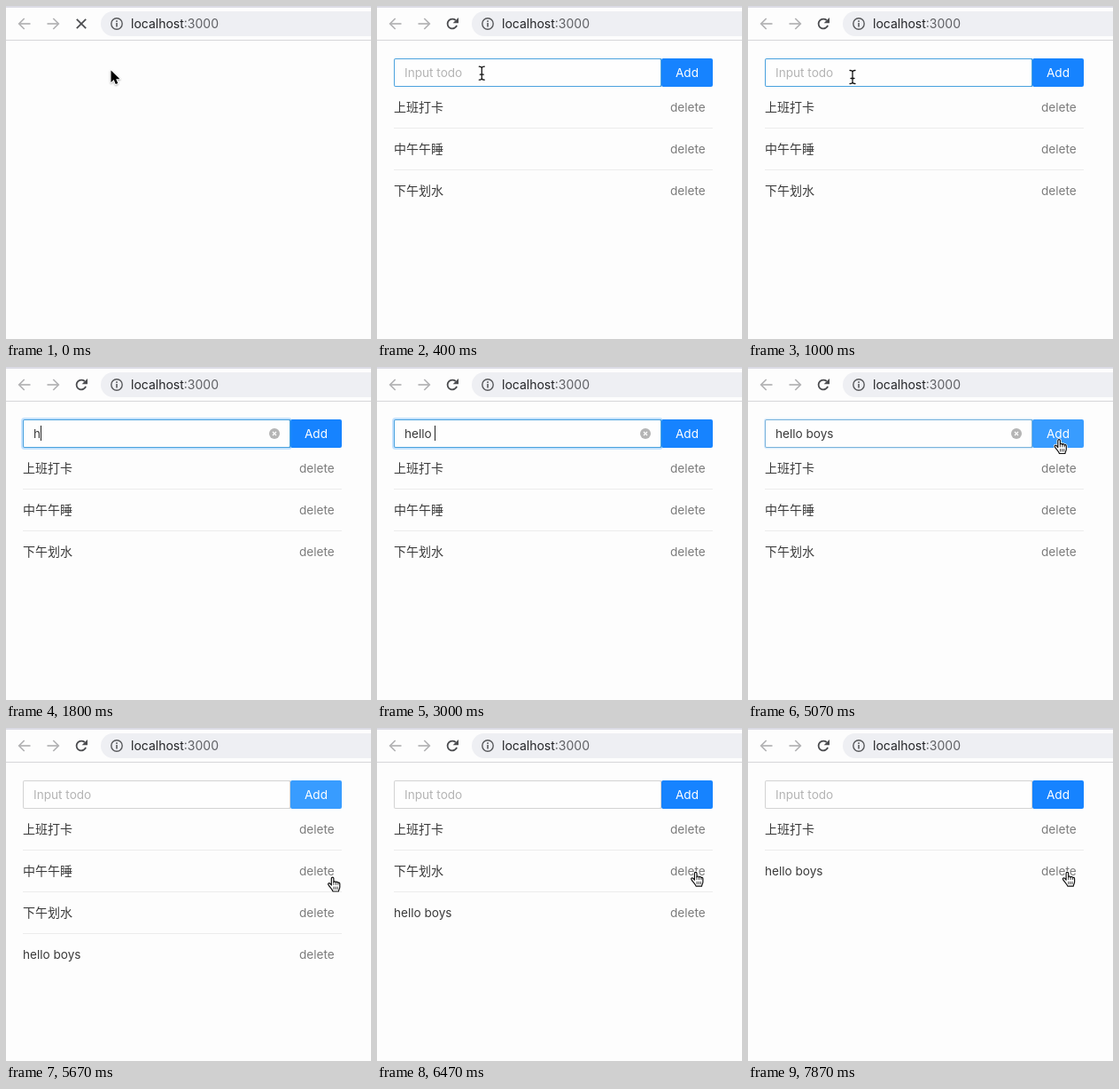
An HTML page with a canvas that plays this animation: 412x375 px, repeating every 8.27 s.

```html
<!DOCTYPE html>
<html lang="en">
<head>
<meta charset="utf-8">
<title>Todo list</title>
<style>
  html, body { margin: 0; width: 100%; height: 100%; overflow: hidden; background: #fdfdfd; }
  canvas { display: block; width: 412px; height: 375px; }
</style>
</head>
<body>
<canvas id="stage" width="412" height="375"></canvas>
<script>
const ctx = document.getElementById('stage').getContext('2d');
const LOOP = 8270, FRAME = 200 / 3;
const UI = '13.6px Inter, "Noto Sans CJK SC", "Noto Sans CJK", sans-serif';
const CJK = '14px "Noto Sans CJK SC", "Noto Sans CJK", sans-serif';
const URL_FONT = '14px Inter, sans-serif';
const INK = '#3a3a3a';

// Moments of the story, in ms
const T = {
  render: 130, loaded: 330, focus: 1070, blur: 4930, add: 5130,
  press: 6130, remove1: 6200, remove2: 6930, gone: 7870
};
const PHRASE = 'hello boys';
const KEYS = [1800, 2000, 2200, 2330, 2530, 3000, 3130, 3200, 3400, 3470];

// Pointer hot spot: time, x, y
const PATH = [
  [70, 118.5, 72.5], [800, 118, 80], [1000, 118, 80], [1330, 113, 82],
  [4400, 113, 82], [4870, 351, 82], [5200, 351, 82], [5670, 368.5, 168.5],
  [5730, 368.5, 168.5], [6000, 359.6, 162.7], [7260, 359.6, 162.7], [7330, 360.3, 162.7]
];

const ARROW = new Path2D('M0 0V13.5L3.2 10.6 5.3 15.6 7.8 14.5 5.7 9.7H10Z');
const BEAM = new Path2D('M-3-7.5Q0-7.5 0-5.5Q0-7.5 3-7.5M0-6V6M-3 7.5Q0 7.5 0 5.5Q0 7.5 3 7.5M-2 1.5H2');
const HAND = new Path2D('M-1.2 8.5V1C-1.2-.8 1.4-.8 1.4 1V5.2C1.7 3.9 3.8 4 3.9 5.4' +
  'C4.4 4.3 6.2 4.6 6.3 6C6.9 5.2 8.3 5.6 8.3 7V10.5C8.3 12.5 7.1 13.3 6.9 15.5' +
  'H.5C-.2 13-3.5 10.2-4.7 8C-5.5 6.6-3.9 5.6-2.7 6.7Z');
const FINGERS = new Path2D('M1.4 5V8M3.9 5.5V8M6.3 6V8M1.5 10.5V13M3.6 10.5V13M5.7 10.5V13');

const clamp = v => Math.max(0, Math.min(1, v));
const smooth = v => v * v * (3 - 2 * v);
const ramp = (t, start, span = 300) => smooth(clamp((t - start) / span));
const inside = (p, x, y, w, h) => p.x >= x && p.x < x + w && p.y >= y && p.y < y + h;

function mix(a, b, k) {
  return `rgb(${a.map((v, i) => Math.round(v + (b[i] - v) * k))})`;
}

function text(str, x, y, color, font = UI) {
  ctx.font = font;
  ctx.fillStyle = color;
  ctx.fillText(str, x, y);
}

function box(x, y, w, h, r, color) {
  ctx.fillStyle = color;
  ctx.beginPath();
  ctx.roundRect(x, y, w, h, r);
  ctx.fill();
}

function line(color, width, ...points) {
  ctx.strokeStyle = color;
  ctx.lineWidth = width;
  ctx.beginPath();
  points.forEach(([x, y], i) => i ? ctx.lineTo(x, y) : ctx.moveTo(x, y));
  ctx.stroke();
}

function ring(x, y, r, from, to, color, width) {
  ctx.strokeStyle = color;
  ctx.lineWidth = width;
  ctx.beginPath();
  ctx.arc(x, y, r, from, to);
  ctx.stroke();
}

function cross(x, y, r, color, width) {
  line(color, width, [x - r, y - r], [x + r, y + r]);
  line(color, width, [x + r, y - r], [x - r, y + r]);
}

function navArrow(x, dir) {
  line('#b1b1b3', 1.7, [x - 6.5 * dir, 20], [x + 6 * dir, 20]);
  line('#b1b1b3', 1.7, [x + .3 * dir, 14], [x + 6.3 * dir, 20], [x + .3 * dir, 26]);
}

function toolbar(t) {
  box(0, 0, 412, 2, 0, '#dcdce5');
  navArrow(21, -1);
  navArrow(53, 1);
  if (t < T.loaded) {
    cross(85, 20, 5.2, '#4b4c4f', 1.7);
  } else {
    ring(85, 20, 5.4, .35, Math.PI * 1.75, '#4b4c4f', 1.8);
    ctx.fillStyle = '#4b4c4f';
    ctx.fill(new Path2D('M92 13V19.3H85.7Z'));
  }
  box(107, 6, 330, 28, 14, '#eeeff3');
  ring(125, 20, 6.2, 0, Math.PI * 2, '#58595c', 1.4);
  box(124.2, 19, 1.6, 4.4, 0, '#58595c');
  box(124.2, 16.3, 1.6, 1.6, 0, '#58595c');
  text('localhost', 141, 25, '#242528', URL_FONT);
  text(':3000', 141 + ctx.measureText('localhost').width, 25, '#606165', URL_FONT);
  box(0, 38, 412, 1, 0, '#d6d6d9');
}

function pointerAt(t) {
  let i = PATH.findIndex(k => k[0] > t);
  if (i === 0) i = 1;
  if (i < 0) i = PATH.length - 1;
  const [t0, x0, y0] = PATH[i - 1], [t1, x1, y1] = PATH[i];
  const k = smooth(clamp((t - t0) / (t1 - t0)));
  return { x: x0 + (x1 - x0) * k, y: y0 + (y1 - y0) * k };
}

function todos(t) {
  const list = ['上班打卡'];
  if (t < T.remove1) list.push('中午午睡');
  if (t < T.remove2) list.push('下午划水');
  if (t >= T.add) list.push(PHRASE);
  return list;
}

function field(t) {
  const focus = ramp(t, T.focus) * (1 - ramp(t, T.blur));
  const blue = ramp(t, T.render) * (1 - ramp(t, T.blur, 340));
  if (focus > 0) {
    const s = 2 * focus;
    box(19 - s, 59 - s, 302 + 2 * s, 32 + 2 * s, 2 + s, `rgba(24,144,255,${.25 * focus})`);
  }
  box(19, 59, 302, 32, [2, 0, 0, 2], mix([211, 211, 211], [72, 161, 222], blue));
  box(20, 60, 300, 30, 1, '#fefefe');

  const typed = t < T.add ? PHRASE.slice(0, KEYS.filter(k => k <= t).length) : '';
  if (typed) {
    text(typed, 31, 80, INK);
    ctx.fillStyle = '#b5b5b5';
    ctx.beginPath();
    ctx.arc(303, 75, 6, 0, Math.PI * 2);
    ctx.fill();
    cross(303, 75, 2, '#fff', 1.2);
  } else {
    text('Input todo', 31, 80, '#b4b4b4');
  }

  if (t >= T.focus && t < T.blur) {
    const last = Math.max(T.focus, ...KEYS.filter(k => k <= t));
    if ((t - last + 3) % 1060 < 530) {
      ctx.font = UI;
      box(Math.floor(31 + ctx.measureText(typed).width), 66, 1, 17, 0, '#222');
    }
  }
}

function button(t) {
  const light = ramp(t, 4760) * (1 - ramp(t, T.press));
  const wave = clamp((t - T.add) / 700);
  if (wave > 0 && wave < 1) {
    const s = 4.5 * (1 - Math.pow(1 - wave, 6));
    box(321 - s, 59 - s, 58 + 2 * s, 32 + 2 * s, 2 + s,
      `rgba(24,140,255,${.22 * Math.pow(1 - wave, 3)})`);
  }
  box(321, 59, 58, 32, 2, mix([22, 131, 255], [56, 156, 255], light));
  ctx.textAlign = 'center';
  text('Add', 350, 80, '#fff');
  ctx.textAlign = 'left';
}

function rows(list) {
  list.forEach((item, i) => {
    const y = 119 + 47 * i;
    text(item, 19, y, INK, item === PHRASE ? UI : CJK);
    text('delete', 331, y, '#7c7c7c');
    if (i < list.length - 1) box(19, y + 18, 360, 1, 0, '#ececec');
  });
}

function outline(path, color, width) {
  ctx.strokeStyle = color;
  ctx.lineWidth = width;
  ctx.stroke(path);
}

function pointer(t, count) {
  if (t >= T.gone || (t >= KEYS[0] && t < 4400)) return;
  const p = pointerAt(t);
  const ready = t >= T.render;
  const overLink = p.x >= 331 && p.x < 372 &&
    Array.from({ length: count }, (_, i) => 114 + 47 * i).some(y => Math.abs(p.y - y) < 11);
  ctx.save();
  ctx.translate(p.x, p.y);
  ctx.lineJoin = ctx.lineCap = 'round';
  if (ready && inside(p, 19, 59, 302, 32)) {
    outline(BEAM, '#fff', 2.8);
    outline(BEAM, '#111', 1.3);
  } else if (ready && (overLink || inside(p, 321, 59, 58, 32))) {
    outline(HAND, '#fff', 2.6);
    ctx.fillStyle = '#fff';
    ctx.fill(HAND);
    outline(HAND, '#111', 1.2);
    outline(FINGERS, '#111', .8);
  } else {
    ctx.shadowColor = 'rgba(0,0,0,.3)';
    ctx.shadowBlur = 2;
    ctx.shadowOffsetY = 1;
    outline(ARROW, '#fff', 1.8);
    ctx.shadowColor = 'transparent';
    ctx.fillStyle = '#000';
    ctx.fill(ARROW);
  }
  ctx.restore();
}

function draw(t) {
  box(0, 0, 412, 375, 0, '#fdfdfd');
  toolbar(t);
  const list = todos(t);
  if (t >= T.render) {
    button(t);
    field(t);
    rows(list);
  }
  pointer(t, list.length);
}

const start = performance.now();
function tick() {
  const t = (performance.now() - start) % LOOP;
  draw(Math.round(Math.floor((t + 4) / FRAME) * FRAME));
  requestAnimationFrame(tick);
}
tick();
</script>
</body>
</html>
```
